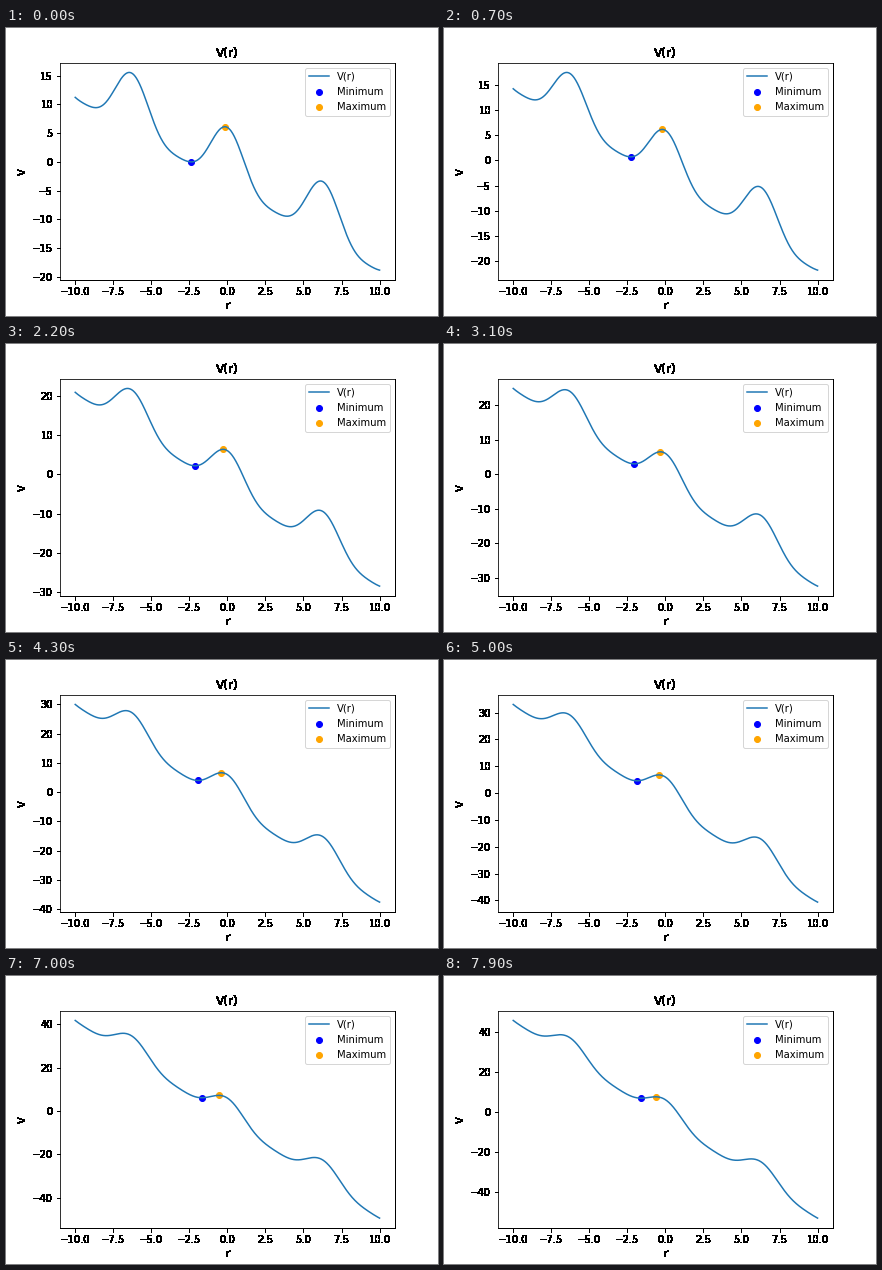
A matplotlib script for the animation above (8 s loop, 432 by 288 pixels).

```python
import matplotlib.pyplot as plt
import numpy as np
from matplotlib.animation import FuncAnimation

FRAMES, INTERVAL = 80, 100
TILT0, TILT_STEP = 1.502, 0.0436

r = np.linspace(-10, 10, 1000)
well = np.linspace(-3.2, -1.1, 1000)   # holds the local minimum
hill = np.linspace(-1.1, 0.5, 1000)    # holds the local maximum


def potential(x, tilt):
    return 5 * np.cos(x) + np.cos(2 * x) - tilt * x


def solid_black(img, dpi):
    """Turn every touched pixel fully black, without soft edges."""
    out = np.zeros_like(img)
    out[..., 3] = img[..., 3] > 0
    return out, 0, 0


fig, ax = plt.subplots(figsize=(6, 4), dpi=72, facecolor="white")
fig.subplots_adjust(left=0.125, right=0.9, bottom=0.125, top=0.88)

line, = ax.plot(r, potential(r, TILT0), label="V(r)")
low = ax.scatter([0], [0], color="blue", label="Minimum")
high = ax.scatter([0], [0], color="orange", label="Maximum")
ax.set(title="V(r)", xlabel="r", ylabel="V", xlim=(-11, 11))
ax.legend(loc="upper right")

for part in (ax.title, ax.xaxis, ax.yaxis,
             ax.spines["right"], ax.spines["bottom"]):
    part.set_agg_filter(solid_black)


def update(i):
    tilt = TILT0 + TILT_STEP * i
    v = potential(r, tilt)
    line.set_ydata(v)

    v_well, v_hill = potential(well, tilt), potential(hill, tilt)
    a, b = v_well.argmin(), v_hill.argmax()
    low.set_offsets([(well[a], v_well[a])])
    high.set_offsets([(hill[b], v_hill[b])])

    pad = 0.05 * np.ptp(v)
    ax.set_ylim(v.min() - pad, v.max() + pad)
    return line, low, high


anim = FuncAnimation(fig, update, frames=FRAMES, interval=INTERVAL,
                     repeat=True, repeat_delay=0, blit=False)
plt.show()
```
